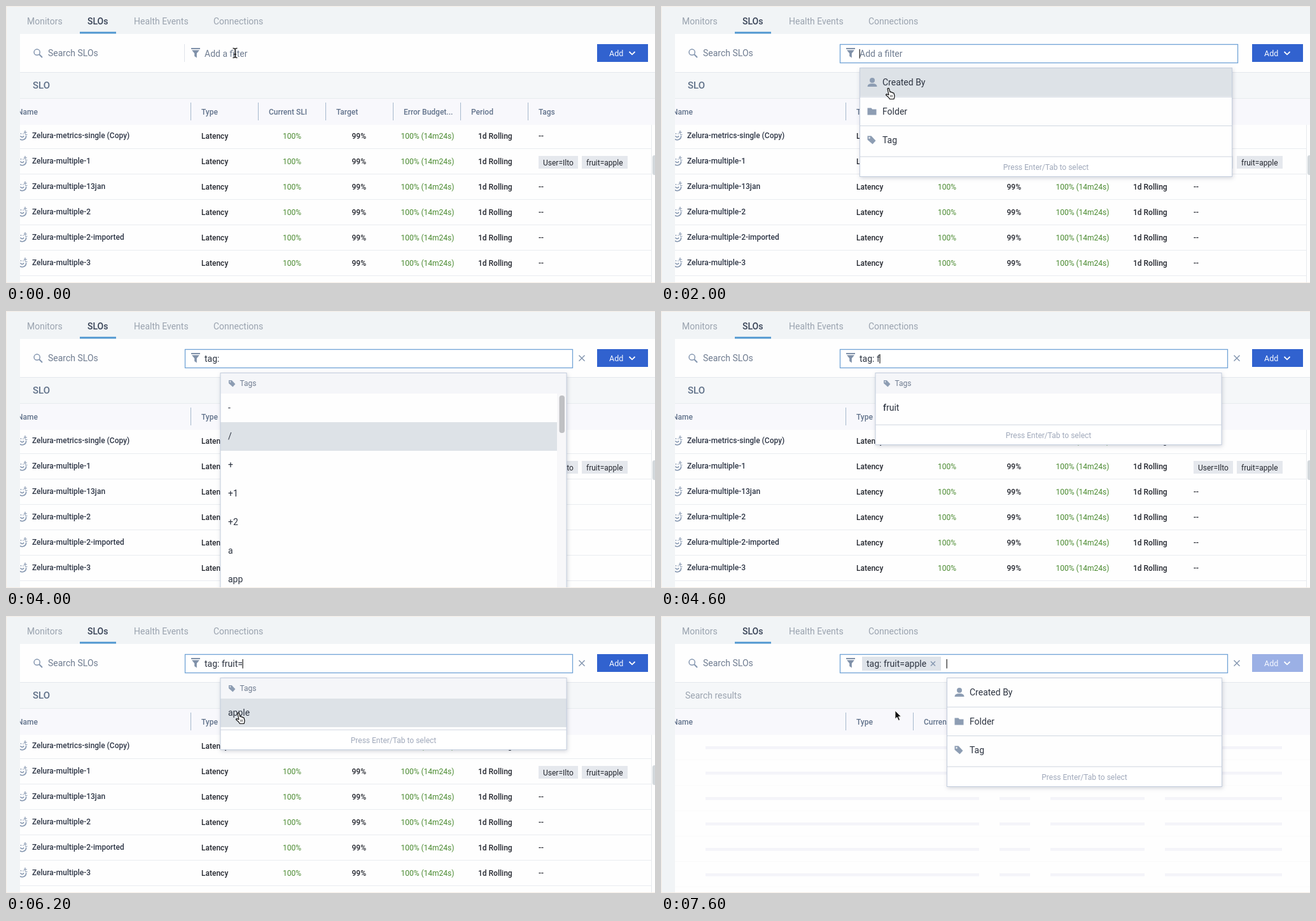
An HTML page that plays this animation: 1020 px wide and 436 px high, repeating every 8000 ms.

```html
<!DOCTYPE html>
<html lang="en">
<head>
<meta charset="utf-8">
<title>SLO filter</title>
<style>
  html, body { margin: 0; width: 100%; height: 100%; overflow: hidden; background: #f1f4f6; }
  svg { display: block; width: 100vw; height: 100vh; }
  text { font: 12px Roboto, "Liberation Sans", sans-serif; fill: #23262e; white-space: pre; }
  .m { font-size: 14px; }
  .b { font-weight: 500; }
  .tab { fill: #9aa3af; }
  .on { fill: #364155; }
  .head { font-weight: 500; fill: #62738c; }
  .cell { font-weight: 500; fill: #24272f; }
  .name { font-weight: 500; fill: #2f3747; }
  .ok { fill: #4a8a30; }
  .soft { fill: #6f7c90; }
  .hint { fill: #9fa8ba; text-anchor: middle; }
  .item { font-size: 14px; fill: #2c3340; }
  .ico { fill: #8d9db3; }
  .line { fill: none; stroke: #8597b0; stroke-width: 1.5; }
  .pop { filter: drop-shadow(1px 2px 3px rgba(40, 50, 80, .2)); }
  .frame { fill: none; stroke: #c3cddd; }
  .cursor { fill: #fff; stroke: #111; stroke-width: 1.2; stroke-linejoin: round; }
</style>
</head>
<body>
<svg viewBox="0 0 1020 436" preserveAspectRatio="none">
  <defs>
    <g id="tag"><path class="ico" d="M0 0H6L13 7.5L8 13L0 6Z"/><circle cx="3" cy="3" r="1.2" fill="#fff"/></g>
    <g id="user" class="ico"><circle cx="7.5" cy="4" r="4"/><path d="M0 14Q0 9 7.5 9T15 14Z"/></g>
    <path id="folder" class="ico" d="M0 1H6L7.5 3H14V12H0Z"/>
    <g id="gauge" class="line">
      <path d="M31.6 204A6.2 6.2 0 0 1 20 207.5M22.5 204.5Q25.5 208.5 28.2 204.5"/>
      <path d="M23.5 200V202M27 200.5V202M30 196V201.5M27.8 199H33M30 202.5H33.5" stroke-width="1.2"/>
    </g>
    <g id="beam" fill="none" stroke="#222" stroke-width="1.4">
      <path d="M-3.5 -7.5Q0 -7.5 0 -5.5Q0 -7.5 3.5 -7.5M0 -6V6M-3.5 7.5Q0 7.5 0 5.5Q0 7.5 3.5 7.5M-2 2H2"/>
    </g>
    <g id="hand" class="cursor">
      <path d="M4 2.2Q5 .6 6.4 2L8 7.5Q9.2 6.6 10 8Q11.4 7.4 12 8.8Q13.8 8.4 14.2 10L15 13.5Q15 16 14 18.5H7.5Q6 15.5 2 12.6Q.8 11 2.8 10.6L6 12Z"/>
      <path d="M9 12V15.5M11.2 12V15.5" stroke-width=".8"/>
    </g>
    <path id="arrow" d="M0 0V13L3 10.3L5.2 15.5L7.5 14.5L5.3 9.5H9.4Z" fill="#111" stroke="#fff" stroke-width=".8"/>
  </defs>
  <g id="base"></g>
  <g id="live"></g>
  <text id="probe" class="m" visibility="hidden"></text>
</svg>
<script>
const LOOP = 8000;
const COLS = [18, 307, 413, 519, 625, 731, 837];
const HEADS = ["Name", "Type", "Current SLI", "Target", "Error Budget...", "Period", "Tags"];
const NAMES = ["metrics-single (Copy)", "multiple-1", "multiple-13jan", "multiple-2", "multiple-2-imported", "multiple-3"];
const KEYS = ["-", "/", "+", "+1", "+2", "a", "app"];

const $ = id => document.getElementById(id);
const rect = (x, y, w, h, fill, more = "") => `<rect x="${x}" y="${y}" width="${w}" height="${h}" fill="${fill}" ${more}/>`;
const text = (x, y, s, cls = "") => `<text x="${x}" y="${y}" class="${cls}">${s}</text>`;
const use = (id, x, y, more = "") => `<use href="#${id}" transform="translate(${x} ${y}) ${more}"/>`;
const path = (d, more = 'class="line"') => `<path d="${d}" ${more}/>`;
const cross = (x, y, r) => path(`M${x - r} ${y - r}l${2 * r} ${2 * r}m0 ${-2 * r}l${-2 * r} ${2 * r}`);

// Each cue changes part of the state from its time on.
const cues = [
  [0, { menu: "", typed: "", caret: 0, hover: -1, row: -1, done: 0, keys: KEYS, cursor: ["beam", 360, 74] }],
  [200, { cursor: ["beam", 358, 77] }],
  [400, { cursor: ["beam", 357, 79] }],
  [800, { menu: "kinds", caret: 1, cursor: ["beam", 357, 80] }],
  [1000, { cursor: ["beam", 356, 82] }],
  [1200, { cursor: ["beam", 356, 84] }],
  [1400, { caret: 0 }],
  [2000, { caret: 1, hover: 0, cursor: ["hand", 352, 128] }],
  [2200, { hover: 1, cursor: ["hand", 352, 178] }],
  [2400, { hover: 2, cursor: ["hand", 358, 203] }],
  [2600, { menu: "tags", typed: "tag: ", hover: 1, cursor: ["hand", 385, 216] }],
  [2800, { caret: 0 }],
  [3400, { caret: 1 }],
  [4000, { caret: 0, cursor: null }],
  [4600, { caret: 1, typed: "tag: f", hover: -1, keys: ["fruit"] }],
  [4800, { typed: "tag: fr" }],
  [5000, { typed: "tag: frui" }],
  [5200, { typed: "tag: fruit" }],
  [5400, { row: 1, cursor: ["hand", 372, 232] }],
  [5600, { caret: 0, row: 0, cursor: ["hand", 352, 223] }],
  [5800, { row: -1, cursor: ["hand", 353, 205] }],
  [6000, { caret: 1, hover: 0, cursor: ["hand", 356, 170] }],
  [6200, { typed: "tag: fruit=", keys: ["apple"], cursor: ["hand", 360, 151] }],
  [6400, { cursor: ["hand", 363, 149] }],
  [6600, { caret: 0 }],
  [7000, { caret: 1 }],
  [7600, { menu: "kinds", done: 1, hover: -1, cursor: ["arrow", 368, 149] }]
];

const stateAt = t => Object.assign({}, ...cues.filter(c => c[0] <= t).map(c => c[1]));

function widthOf(s) {
  $("probe").textContent = s;
  return s ? $("probe").getComputedTextLength() : 0;
}

function drawBase() {
  const tabs = [[33, "Monitors"], [128, "SLOs"], [201, "Health Events"], [326, "Connections"]];
  return rect(0, 0, 1020, 436, "#f1f4f6") + rect(22, 44, 998, 392, "#fefefe") +
    tabs.map(([x, s], i) => text(x, 29, s, i === 1 ? "m b on" : "m tab")).join("") +
    rect(116, 40.6, 57, 2.9, "#4f97d0") +
    '<circle cx="48.7" cy="72.7" r="4.6" class="line"/>' + path("M52.3 76.3L57 81", 'class="line" style="stroke-width:2"') +
    text(66, 78.7, "Search SLOs", "m soft") +
    rect(22, 104, 998, 1, "#e4e8ed") + rect(22, 105, 998, 40, "#f5f7f9") +
    rect(22, 145, 998, 1, "#e8ebef") + rect(22, 146, 998, 41, "#f8f8fc") +
    HEADS.map((s, i) => text(COLS[i], 170.5, s, "head") + (i ? rect(COLS[i] - 17, 152, 1, 28, "#a6b9cd") : "")).join("");
}

function drawRow(name, i) {
  const y = 40 * i;
  const cells = [[307, "Latency"], [435, "100%", "ok"], [543.5, "99%"], [620.5, "100% (14m24s)", "ok"], [742, "1d Rolling"]];
  const chip = (x, w, s) => rect(x, 236, w, 20, "#e5e8ed") + text(x + 7, 251, s);
  return use("gauge", 0, y) + text(41, 207.5 + y, "Zelura-" + name, "name") +
    cells.map(([x, s, cls = "cell"]) => text(x, 209.3 + y, s, cls)).join("") +
    (i === 1 ? chip(837, 62, "User=Ilto") + chip(905, 72, "fruit=apple") : text(837, 209 + y, "--", "cell")) +
    rect(22, 224 + y, 992, 1, "#e9ecf0");
}

function drawHover(row) {
  if (row < 0) return "";
  const dots = [199, 204.5, 210].map(y => `<circle cx="986" cy="${y}" r="1.7" class="ico"/>`).join("");
  return `<g transform="translate(0 ${40 * row})">` + rect(22, 187, 992, 37, "#eef0f4") +
    path("M267 199H262V210H273V205M266 206L273 198.5M269 198H274V203M264.5 207.5H270") + dots + "</g>";
}

function drawTable(s) {
  if (s.done) {
    const bars = [[70, 430], [532, 48], [612, 148], [792, 184]];
    return text(38, 129.5, "Search results", "m tab") + NAMES.map((_, i) =>
      bars.map(([x, w]) => rect(x, 205 + 40 * i, w, 4.5, "#f4f4f9")).join("") +
      rect(22, 226 + 40 * i, 998, 1, "#fafafa")).join("");
  }
  return `<text x="42" y="129.7" class="b" style="font-size:15px;fill:#5f7088">SLO</text>` +
    drawHover(s.row) + NAMES.map(drawRow).join("") +
    rect(1014, 187, 1, 249, "#e6e9ed") + rect(1016, 235, 8, 31, "#d3d8dc", 'rx="3"');
}

function drawInput(s) {
  const x = s.done ? 449 : 312 + widthOf(s.typed);
  const full = s.typed ? 609 : 625;
  let out = s.menu ? rect(281.5, 60.5, full, 29, "#fff", 'stroke="#70a3d6" stroke-width="1.3"') : rect(280, 60, 1, 28, "#e0e4e9");
  out += path("M291 66H305V68H291ZM292 69.5H304L299.8 74.5V81.5L296.2 79V74.5Z", 'fill="#7f90a8"');
  if (s.done) out += rect(316, 64, 124, 22, "#dfe4ea") + text(323, 79.7, "tag: fruit=apple", "item") + cross(427.5, 75, 3.5);
  else out += s.typed ? text(312, 79.7, s.typed, "item") : text(312, 79.7, "Add a filter", "m soft");
  if (s.typed) out += cross(905, 74.3, 4.5);
  if (s.caret) out += rect(x - .4, 68, 1.2, 14.5, "#222");
  return out;
}

const button = dim => rect(929, 60, 80, 28, dim ? "#9bb0e5" : "#3162cf") +
  `<text x="948" y="78.7" style="font-size:12.5px;fill:#f4f7ff">Add</text>` +
  path("M979.5 72L984 76.3L988.5 72", 'fill="none" stroke="#fff" stroke-width="1.8"');

const footer = (w, y, h) => rect(0, y, w, h, "#fff") + rect(0, y - 1, w, 1.5, "#dfe3ea") +
  text(w / 2, y + h / 2 + 4.5, "Press Enter/Tab to select", "hint");

// Both menus are drawn from their own top left corner.
function drawKinds(s) {
  const w = s.done ? 432 : 585;
  const kinds = [["user", "Created By", 15.5], ["folder", "Folder", 62], ["tag", "Tag", 107]];
  return `<g class="pop" transform="translate(${s.done ? 449.5 : 312.5} 97.5)">` + rect(0, 0, w, 171, "#fefefe") +
    kinds.map(([id, label, y], i) => (i === s.hover ? rect(0, 45.2 * i, w, 45, "#dde2e7") : "") +
      use(id, 12, y) + text(35.5, 27.7 + 45.3 * i, label, "item") +
      (i < 2 ? rect(0, 45.3 * (i + 1), w, 1, "#d0d7e2") : "")).join("") +
    footer(w, 140, 31) + `<rect width="${w}" height="171" class="frame"/></g>`;
}

function drawTags(s) {
  const long = s.keys.length > 1, h = long ? 345 : 113, w = long ? 529 : 544;
  const part = s.typed.slice(5).replace(/.*=/, "").length;
  return '<g class="pop" transform="translate(337 97.5)">' + rect(0, 0, 544, h, "#fefefe") +
    rect(0, 0, 544, 32.5, "#f5f6f9") + use("tag", 13, 11.5, "scale(.8)") + text(30.5, 20.7, "Tags", "soft") +
    s.keys.map((k, i) => (i === s.hover ? rect(0, 32.5 + 45 * i, w, 45, "#dde2e7") : "") +
      text(12, 59.8 + 45 * i, `<tspan class="b">${k.slice(0, part)}</tspan>${k.slice(part)}`, "item")).join("") +
    (long ? rect(529, 32.5, 15, 312, "#f7f7f9") + rect(532.5, 35.5, 8.5, 59, "#bfc0c3", 'rx="4"') : footer(544, 82, 31)) +
    `<rect width="544" height="${h}" class="frame"/></g>`;
}

function draw(s) {
  const menu = { kinds: drawKinds, tags: drawTags }[s.menu];
  return drawTable(s) + rect(0, 44, 22, 392, "#f1f4f6") + drawInput(s) + button(s.done) +
    (menu ? menu(s) : "") +
    '<path d="M0 .5H1020M.5 0V436M0 435.5H1020" stroke="#f4ece4"/>' +
    (s.cursor ? use(...s.cursor) : "");
}

let shown = "";
function tick() {
  const s = stateAt(performance.now() % LOOP);
  const key = JSON.stringify(s);
  if (key !== shown) {
    $("live").innerHTML = draw(s);
    shown = key;
  }
  requestAnimationFrame(tick);
}

$("base").innerHTML = drawBase();
tick();
</script>
</body>
</html>
```
